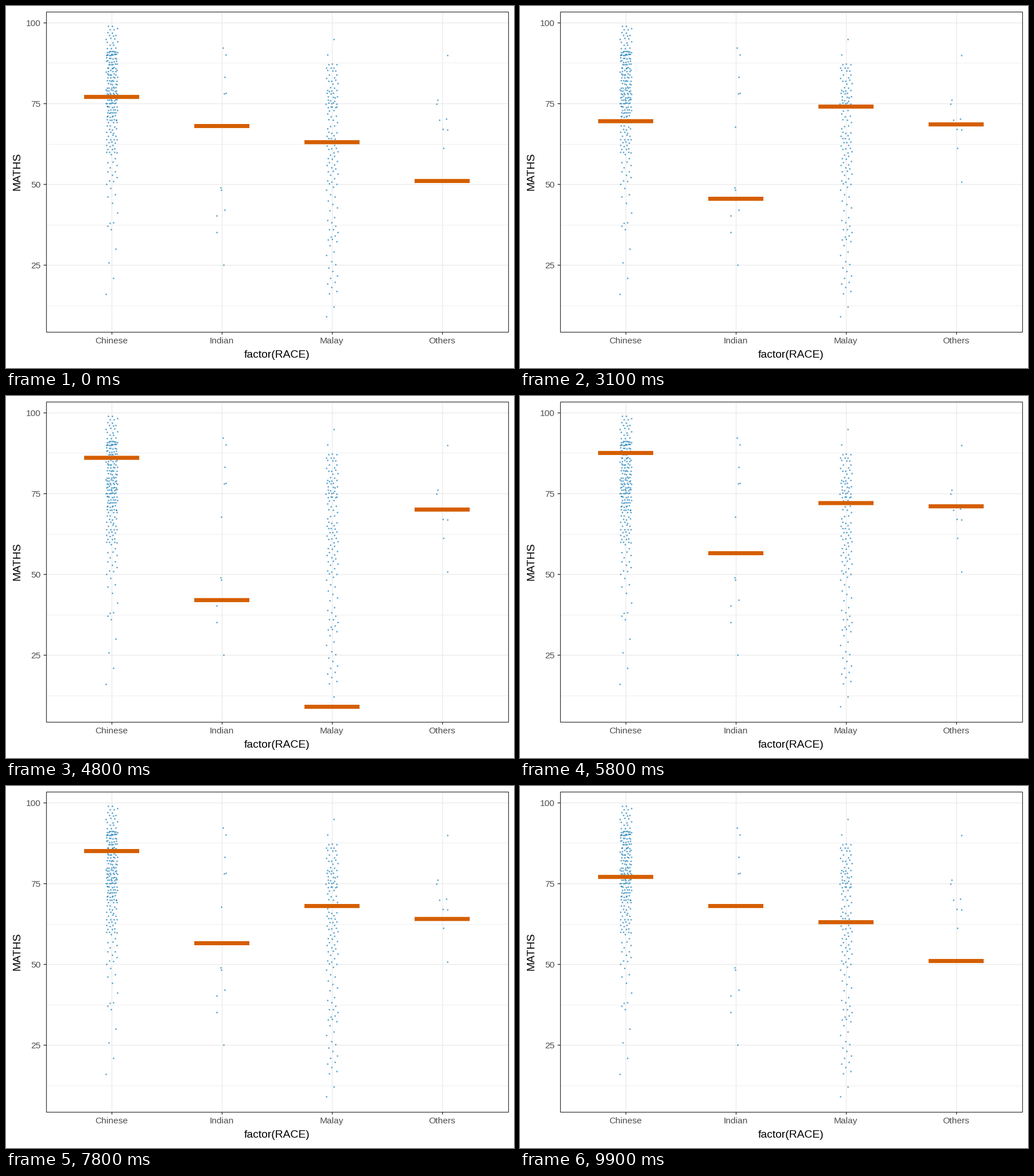
A matplotlib script that plays this animation: 885x632 px, repeating every 10 s.

```python
import numpy as np
import matplotlib.pyplot as plt
from matplotlib.animation import FuncAnimation
from matplotlib.patches import Rectangle

W, H, DPI = 885, 632, 126.4
LEFT, RIGHT, TOP, BOTTOM = 69.5, 875.3, 9.7, 568.5
FRAMES = 100
GRID, DARK, LABEL = "#EBEBEB", "#333333", "#4D4D4D"
BLUE, ORANGE = "#0072B2", "#D55E00"
RACES = ["Chinese", "Indian", "Malay", "Others"]
BAR_W, BAR_H = 96, 7.1

plt.rcParams["font.family"] = "Liberation Sans"
rng = np.random.default_rng(7)


def px(width):
    return width * 72 / DPI


def column_x(k):
    return 184.1 + 191.9 * k


def score_y(score):
    return 28.9 + 5.645 * (100 - score)


# One sampled score per step for each race.
DRAWS = np.array([
    [77, 96, 90, 79, 95, 92, 87, 69, 70, 73, 75, 90, 86,
     78, 82, 93, 95, 83, 86, 80, 90, 80, 77, 74, 72],
    [68, 78, 78, 48, 48, 78, 78, 42, 49, 48, 48, 35, 42,
     48, 35, 78, 83, 49, 25, 35, 78, 78, 48, 40, 48],
    [63, 70, 58, 66, 32, 70, 66, 63, 85, 21, 66, 63, 9,
     66, 70, 74, 69, 74, 66, 66, 70, 66, 58, 63, 43],
    [51, 70, 67, 67, 70, 61, 75, 67, 70, 67, 61, 61, 70,
     61, 67, 75, 70, 51, 67, 67, 61, 70, 90, 70, 70],
], float).T
STEPS = len(DRAWS)
STARTS = np.r_[np.arange(0, 49, 4), np.arange(51, 100, 4)]

# Small groups: offset from the column centre in pixels, score.
INDIAN = [(2, 92.2), (7, 90), (5, 83.1), (4, 78), (7, 78.2), (-1, 67.7),
          (-2, 48.9), (-1, 48.3), (5, 42), (-9, 40.3), (-9, 35.1), (3, 25.1)]
OTHERS = [(9, 89.9), (-8, 76), (-10, 74.8), (7, 70.2), (-5, 69.8), (1, 67.1),
          (9, 66.9), (2, 61.1), (9, 50.8)]
# Large groups: rank of a pupil against score, straight in between.
CHINESE = [(0, 16), (1, 21), (3, 30), (4, 36), (7, 38.5), (10, 46), (13, 50),
           (26, 59.5), (58, 69.5), (86, 74.4), (123, 79.4), (151, 84.5),
           (182, 89.5), (201, 91.4), (222, 99)]
MALAY = [(0, 9), (2, 16), (6, 20), (11, 25), (16, 32), (24, 37), (31, 45),
         (37, 50.4), (53, 59), (72, 66.4), (83, 73.4), (93, 75.4), (107, 79.4),
         (120, 85), (127, 87.3), (128, 90), (129, 95)]


def ranked(knots):
    """Whole scores read off a rank curve, jittered both ways."""
    ranks, scores = zip(*knots)
    n = ranks[-1] + 1
    whole = np.round(np.interp(np.arange(n), ranks, scores))
    dx = (np.arange(n) * 0.618 % 1 - 0.5) * 20 + rng.uniform(-1, 1, n)
    return np.column_stack([dx, whole + rng.uniform(-0.25, 0.25, n)])


def make_points():
    groups = [ranked(CHINESE), np.array(INDIAN), ranked(MALAY),
              np.array(OTHERS)]
    xs = [column_x(k) + g[:, 0] for k, g in enumerate(groups)]
    ys = [score_y(g[:, 1]) for g in groups]
    return np.concatenate(xs), np.concatenate(ys)


fig = plt.figure(figsize=(W / DPI, H / DPI), dpi=DPI, facecolor="white")
ax = fig.add_axes([0, 0, 1, 1])
ax.set(xlim=(0, W), ylim=(H, 0))
ax.axis("off")


def line(xs, ys, color, width, z):
    ax.plot(xs, ys, color=color, lw=px(width), zorder=z,
            solid_capstyle="butt")


for score in (12.5, 37.5, 62.5, 87.5):
    line([LEFT, RIGHT], [score_y(score)] * 2, GRID, 0.8, 1)
for score in (25, 50, 75, 100):
    y = score_y(score)
    line([LEFT, RIGHT], [y, y], GRID, 1.4, 1)
    line([LEFT - 4.8, LEFT], [y, y], DARK, 1.4, 5)
    ax.text(60.8, y + 5.8, str(score), size=8.8, color=LABEL, ha="right",
            va="baseline")
for k, race in enumerate(RACES):
    x = column_x(k)
    line([x, x], [TOP, BOTTOM], GRID, 1.4, 1)
    line([x, x], [BOTTOM, BOTTOM + 4.8], DARK, 1.4, 5)
    ax.text(x, 589.3, race, size=8.8, color=LABEL, ha="center", va="baseline")

ax.text((LEFT + RIGHT) / 2, 614.2, "factor(RACE)", size=11, ha="center",
        va="baseline")
ax.text(24.8, (TOP + BOTTOM) / 2, "MATHS", size=11, rotation=90, ha="center",
        va="baseline", rotation_mode="anchor")
ax.add_patch(Rectangle((LEFT, TOP), RIGHT - LEFT, BOTTOM - TOP, fill=False,
                       ec=DARK, lw=px(1.2), zorder=4))

ax.scatter(*make_points(), s=px(2.7) ** 2, c=BLUE, alpha=0.65, lw=0, zorder=2)

bars = [ax.add_patch(Rectangle((column_x(k) - BAR_W / 2, 0), BAR_W, BAR_H,
                               fc=ORANGE, lw=0, zorder=3, snap=False))
        for k in range(len(RACES))]


def scores_at(frame):
    """Hold each draw, with one halfway frame before the next."""
    k = np.searchsorted(STARTS, frame, side="right") - 1
    now, after = DRAWS[k % STEPS], DRAWS[(k + 1) % STEPS]
    return (now + after) / 2 if frame + 1 in STARTS else now


def update(frame):
    for bar, score in zip(bars, scores_at(frame)):
        bar.set_y(score_y(score) - BAR_H / 2)
    return bars


anim = FuncAnimation(fig, update, frames=FRAMES, interval=100, repeat=True,
                     repeat_delay=0, blit=False)
plt.show()
```
